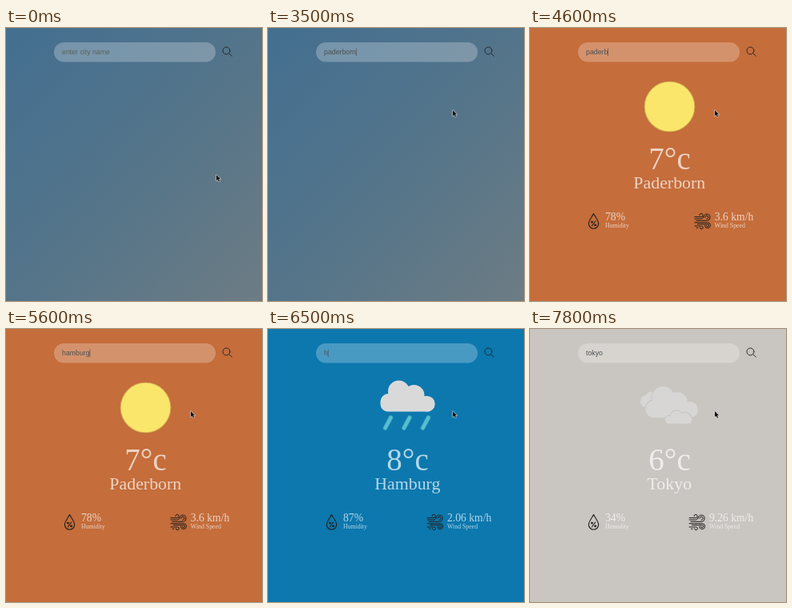
An HTML page with a canvas for the animation above (8 s loop, 320x342 px).

```html
<!DOCTYPE html>
<html lang="en">
<head>
<meta charset="utf-8">
<title>Weather search</title>
<style>
  html, body { margin: 0; width: 100%; height: 100%; overflow: hidden; background: #54748a; }
  canvas { display: block; width: 320px; height: 342px; }
</style>
</head>
<body>
<canvas id="stage"></canvas>
<script>
const W = 320, H = 342, LOOP = 8000, BLINK = 500;
const canvas = document.getElementById('stage');
const ctx = canvas.getContext('2d');
const ratio = window.devicePixelRatio || 1;
canvas.width = W * ratio;
canvas.height = H * ratio;

const SANS = '"Liberation Sans", Arial, sans-serif';
const SERIF = '"Liberation Serif", "Times New Roman", serif';

// Typing runs: start, ms per key, word, erase?
const runs = [
  { at: 2000, step: 160, word: 'paderborn' },
  { at: 4450, step: 70, word: 'paderborn', erase: true },
  { at: 5080, step: 85, word: 'hamburg' },
  { at: 6100, step: 80, word: 'hamburg', erase: true },
  { at: 6800, step: 120, word: 'tokyo' }
];

const reports = [
  { at: 3800, bg: '#c56d3b', temp: 7, city: 'Paderborn', hum: 78, wind: '3.6' },
  { at: 5700, bg: '#0c78ae', temp: 8, city: 'Hamburg', hum: 87, wind: '2.06' },
  { at: 7500, bg: '#c9c5c0', temp: 6, city: 'Tokyo', hum: 34, wind: '9.26' }
];

// The picture loads a moment after its report
const icons = [
  { at: 3900, draw: sun },
  { at: 5800, draw: rain },
  { at: 7600, draw: clouds }
];

const pointer = [
  { at: 200, x: 263, y: 184 },
  { at: 500, x: 226, y: 31 },
  { at: 750, x: 226, y: 31 },
  { at: 1000, x: 231, y: 103 }
];

const latest = (list, t) => list.filter(e => e.at <= t).pop();

function text(str, x, y, size, color, font = SERIF, align = 'left') {
  ctx.font = `${size}px ${font}`;
  ctx.textAlign = align;
  ctx.fillStyle = color;
  ctx.fillText(str, x, y);
}

function disc(x, y, r) {
  ctx.beginPath();
  ctx.arc(x, y, r, 0, Math.PI * 2);
  ctx.fill();
}

function pill(x, y, w, h, r) {
  ctx.beginPath();
  ctx.roundRect(x, y, w, h, r);
  ctx.fill();
}

function stroke(path, color, width) {
  ctx.strokeStyle = color;
  ctx.lineWidth = width;
  ctx.lineCap = ctx.lineJoin = 'round';
  ctx.stroke(new Path2D(path));
}

function sun() {
  ctx.fillStyle = '#d3b052';
  disc(174.5, 98.5, 31.8);
  ctx.fillStyle = '#fbe66c';
  disc(174.5, 98.5, 30.8);
}

function rain() {
  ctx.fillStyle = '#d9d9da';
  disc(163.5, 78, 13.5);
  disc(182.5, 83, 13);
  disc(150.5, 91, 10);
  disc(199, 94, 9.5);
  pill(140.5, 84, 68, 19.5, 9.5);
  for (const x of [153.5, 177, 200.5]) {
    const drop = `M${x} 111 l-7 13`;
    stroke(drop, '#2b8fae', 6);
    stroke(drop, '#55bfd2', 4.6);
  }
}

function bigCloud() {
  disc(166.5, 86, 14);
  disc(184, 92, 13);
  disc(155, 100, 10.5);
  disc(200, 101, 10);
  pill(145, 93, 65, 18, 9);
}

function smallCloud() {
  disc(183, 110.5, 8);
  disc(194, 112, 7);
  pill(169, 109, 33.5, 9.5, 4.7);
}

function clouds() {
  const tone = '#d7d6d4', bg = '#c9c5c0';
  ctx.fillStyle = tone;
  disc(151, 85, 6.5);
  disc(145, 90, 7);
  pill(138.5, 86, 18, 12, 6);
  // Each nearer cloud leaves a thin gap around itself
  for (const shape of [bigCloud, smallCloud]) {
    ctx.fillStyle = bg;
    for (let k = 0; k < 8; k++) {
      const a = k * Math.PI / 4;
      ctx.save();
      ctx.translate(Math.cos(a), Math.sin(a));
      shape();
      ctx.restore();
    }
    ctx.fillStyle = tone;
    shape();
  }
}

function dropIcon() {
  const ink = '#211f1d';
  stroke('M79.5 232.6 C77.5 236.6 73.4 240.8 73.4 245.2 a6.1 6.1 0 0 0 12.2 0 C85.6 240.8 81.5 236.6 79.5 232.6 Z', ink, 1.1);
  text('%', 79.5, 247.6, 7.5, ink, `bold 7.5px ${SANS}`, 'center');
}

function percent() {
  const ink = '#211f1d';
  stroke('M81.7 242 l-4.4 6', ink, 1.1);
  ctx.fillStyle = ink;
  disc(77.5, 243.1, 1.4);
  disc(81.6, 246.9, 1.4);
}

function windIcon(x) {
  ctx.save();
  ctx.translate(x, 232);
  stroke('M.6 4.6 H8.6 a2.1 2.1 0 1 0 -2.1 -2.1 M.6 7 H9.5 a4.4 4.4 0 0 0 2 -2.6', '#211f1d', 1);
  stroke('M2.5 9.3 H15.5 a4.1 4.1 0 1 0 -4.1 -4.1 M13.4 5.2 a2.1 2.1 0 1 1 2.1 2.1', '#211f1d', 1);
  stroke('M.6 11.7 H16.6 a3.5 3.5 0 1 1 -3.5 3.5 M15 15.2 a1.6 1.6 0 1 0 1.6 -1.6 H4', '#211f1d', 1);
  stroke('M.6 16 H9 a1.9 1.9 0 1 1 -1.9 1.9 M3 18.4 h1.6', '#211f1d', 1);
  ctx.restore();
}

function background(report) {
  if (report) {
    ctx.fillStyle = report.bg;
  } else {
    const d = (W + H) / 4;
    const g = ctx.createLinearGradient(W / 2 - d, H / 2 - d, W / 2 + d, H / 2 + d);
    g.addColorStop(0, '#446f90');
    g.addColorStop(.25, '#4b728e');
    g.addColorStop(.55, '#567589');
    g.addColorStop(1, '#6d7c84');
    ctx.fillStyle = g;
  }
  ctx.fillRect(0, 0, W, H);
}

function typed(t) {
  const run = latest(runs, t);
  if (!run) return { value: '', key: 1000 };
  const size = run.word.length;
  const n = Math.min(size, Math.floor((t - run.at) / run.step) + 1);
  return {
    value: run.word.slice(0, run.erase ? size - n : n),
    key: run.at + (n - 1) * run.step
  };
}

function search(t) {
  ctx.fillStyle = 'rgba(255,255,255,.25)';
  pill(60, 18, 202, 24.5, 12.25);
  const { value, key } = typed(t);
  text(value || 'enter city name', 70, 33, 8.77, value ? '#4b5052' : '#5a6259', SANS);
  if (t >= key && Math.floor((t - key) / BLINK) % 2 === 0) {
    const x = 70 + (value ? ctx.measureText(value).width : 0);
    ctx.fillRect(x, 25.5, .7, 9.5);
  }
  stroke('M280 28.4 a4.5 4.5 0 1 1 -9 0 a4.5 4.5 0 1 1 9 0 M278.7 31.6 L282.4 35.1', '#23282c', 1);
}

function details(r) {
  const white = 'rgba(255,255,255,.7)';
  text(r.temp + '°c', 174.5, 177, 39, white, SERIF, 'center');
  text(r.city, 174.3, 201, 21.9, white, SERIF, 'center');
  text(r.hum + '%', 94, 240.6, 13.64, white);
  text('Humidity', 94, 250, 7.8, white);
  const speed = r.wind + ' km/h';
  const x = 279.3 - ctx.measureText('').width - widthOf(speed, 13.64);
  text(speed, x, 240.6, 13.64, white);
  text('Wind Speed', x, 250, 7.8, white);
  stroke('M79.5 232.6 C77.5 236.6 73.4 240.8 73.4 245.2 a6.1 6.1 0 0 0 12.2 0 C85.6 240.8 81.5 236.6 79.5 232.6 Z', '#211f1d', 1.1);
  percent();
  windIcon(x - 25.5);
}

function widthOf(str, size) {
  ctx.font = `${size}px ${SERIF}`;
  return ctx.measureText(str).width;
}

function cursor(t) {
  const from = latest(pointer, t) || pointer[0];
  const to = pointer[pointer.indexOf(from) + 1] || from;
  const p = to === from ? 0 : Math.max(0, (t - from.at) / (to.at - from.at));
  const e = p * p * (3 - 2 * p);
  ctx.save();
  ctx.translate(from.x + (to.x - from.x) * e, from.y + (to.y - from.y) * e);
  const arrow = 'M0 0 V7.2 L1.7 5.7 L2.9 8.5 L4.1 8 L2.9 5.3 H5.2 Z';
  stroke(arrow, 'rgba(225,225,225,.8)', 1.3);
  ctx.fillStyle = '#111';
  ctx.fill(new Path2D(arrow));
  ctx.restore();
}

function draw(t) {
  ctx.setTransform(ratio, 0, 0, ratio, 0, 0);
  const report = latest(reports, t);
  background(report);
  search(t);
  if (report) details(report);
  const icon = latest(icons, t);
  if (icon) icon.draw();
  cursor(t);
}

const start = performance.now();
function tick() {
  draw((performance.now() - start) % LOOP);
  requestAnimationFrame(tick);
}
tick();
</script>
</body>
</html>
```
